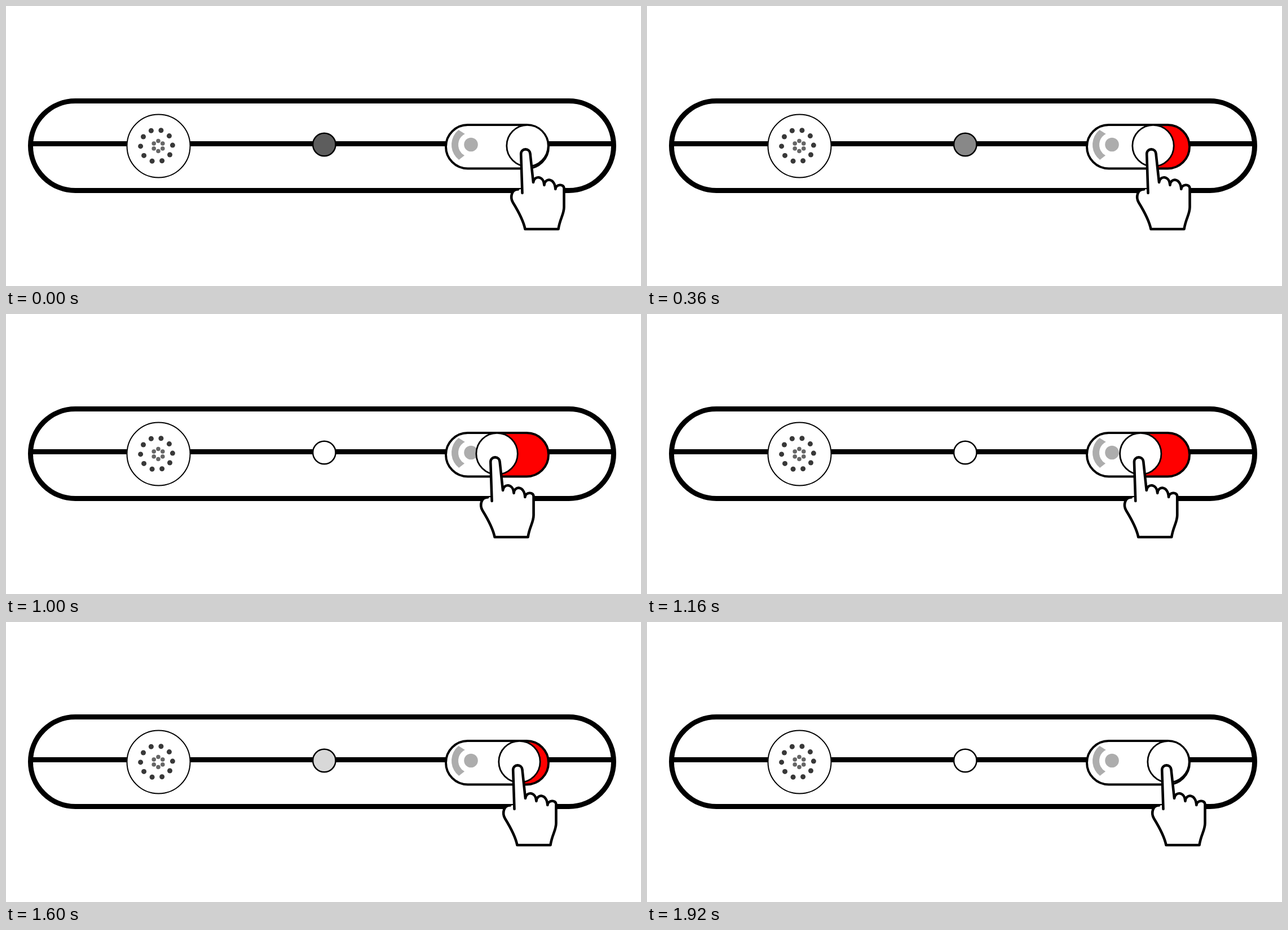
Animation of 1126 by 497 pixels, one loop 3120 ms. Source, as an HTML page with a canvas:

```html
<!DOCTYPE html>
<html lang="en">
<head>
<meta charset="utf-8">
<title>Sliding switch</title>
<style>
html, body { margin: 0; width: 100%; height: 100%; overflow: hidden; background: #fff; }
canvas { display: block; width: 1126px; height: 497px; }
</style>
</head>
<body>
<canvas id="stage" width="1126" height="497"></canvas>
<script>
const ctx = document.getElementById('stage').getContext('2d');
const LOOP = 3120, STEP = 40, TRAVEL = 54, TAU = Math.PI * 2;
const rad = deg => deg * Math.PI / 180;

// Brightness of the lamp: [time, grey]
const lampKeys = [[0, 93], [360, 136], [600, 216], [760, 255], [1200, 255],
  [1400, 216], [1640, 216], [1840, 255], [LOOP, 255]];

const handFill = new Path2D(`M915.5 333 L913.2 263 C913 252 929 251 929.6 263 L935 313
  C936 301 953 300 954.5 318 C955 305 973 304 974.3 325 C975 316 989.5 315 989.5 324
  L989.5 357 C989.5 370 982 378 979.5 396 L920.5 396 C917 379 907 362 899 349
  C893 339 897 325 908 325.5 L915.2 325 Z`);
const handLine = new Path2D(`M915.5 332 L913.2 263 C913 252 929 251 929.6 263 L935 313
  C936 301 953 300 954.5 318 C955 305 973 304 974.3 325 C975 316 989.5 315 989.5 324
  L989.5 357 C989.5 370 982 378 979.5 396 L920.5 396 C917 379 907 362 899 349
  C893 339 897 325 908 325.5`);

function ease(t, from, to) {
  const p = Math.min(1, Math.max(0, (t - from) / (to - from)));
  return (1 - Math.cos(Math.PI * p)) / 2;
}

function lampGrey(t) {
  const i = lampKeys.findIndex(k => k[0] > t);
  const [t0, a] = lampKeys[i - 1], [t1, b] = lampKeys[i];
  return Math.round(a + (b - a) * (t - t0) / (t1 - t0));
}

function paint(fill, line, width) {
  if (fill) { ctx.fillStyle = fill; ctx.fill(); }
  if (line) { ctx.strokeStyle = line; ctx.lineWidth = width; ctx.stroke(); }
}

function circle(x, y, r, fill, line, width) {
  ctx.beginPath();
  ctx.arc(x, y, r, 0, TAU);
  paint(fill, line, width);
}

function pill(x, y, w, h, fill, line, width) {
  ctx.beginPath();
  ctx.roundRect(x, y, w, h, h / 2);
  paint(fill, line, width);
}

function ring(x, y, r, count, start, size, color) {
  for (let i = 0; i < count; i++) {
    const a = rad(start + i * 360 / count);
    circle(x + r * Math.cos(a), y + r * Math.sin(a), size, color);
  }
}

function drawBody() {
  pill(43.5, 168.5, 1034, 159, '#fff', '#000', 9);
  ctx.fillStyle = '#000';
  ctx.fillRect(46, 240, 1030, 9);
  circle(270.5, 248.5, 56, '#fff', '#000', 2);
  ring(267, 248, 28.4, 10, -73.8, 4.5, '#383838');
  ring(270, 248.5, 9, 6, -90, 3.8, '#666');
}

function drawSwitch(shift) {
  const knob = 924.5 - shift;
  pill(780, 211, 182, 77.5, '#fff');
  if (shift > 0.5) {
    ctx.save();
    ctx.beginPath();
    ctx.rect(knob, 200, 100, 100);
    ctx.clip();
    pill(780, 211, 182, 77.5, '#f00');
    ctx.restore();
  }
  circle(824.5, 246, 12.3, '#adadad');
  ctx.beginPath();
  ctx.arc(824, 246.3, 34, rad(128), rad(231));
  ctx.arc(824, 246.3, 22, rad(242), rad(120), true);
  paint('#adadad');
  pill(780, 211, 182, 77.5, null, '#000', 4);
  circle(knob, 248, 36.7, '#fff', '#000', 2.8);
}

function drawHand(shift) {
  ctx.save();
  ctx.translate(-shift, 0);
  ctx.lineJoin = ctx.lineCap = 'round';
  ctx.fillStyle = '#fff';
  ctx.fill(handFill);
  ctx.strokeStyle = '#000';
  ctx.lineWidth = 4.6;
  ctx.stroke(handLine);
  ctx.restore();
}

function draw(time) {
  const t = Math.floor((time % LOOP) / STEP) * STEP;
  const shift = TRAVEL * (ease(t, 0, 720) - ease(t, 980, 1920));
  const grey = lampGrey(t);
  ctx.fillStyle = '#fff';
  ctx.fillRect(0, 0, 1126, 497);
  drawBody();
  circle(564.3, 246, 20.2, `rgb(${grey},${grey},${grey})`, '#000', 2.5);
  drawSwitch(shift);
  drawHand(shift);
}

const begin = performance.now();
function tick() {
  draw(performance.now() - begin);
  requestAnimationFrame(tick);
}
tick();
</script>
</body>
</html>
```
